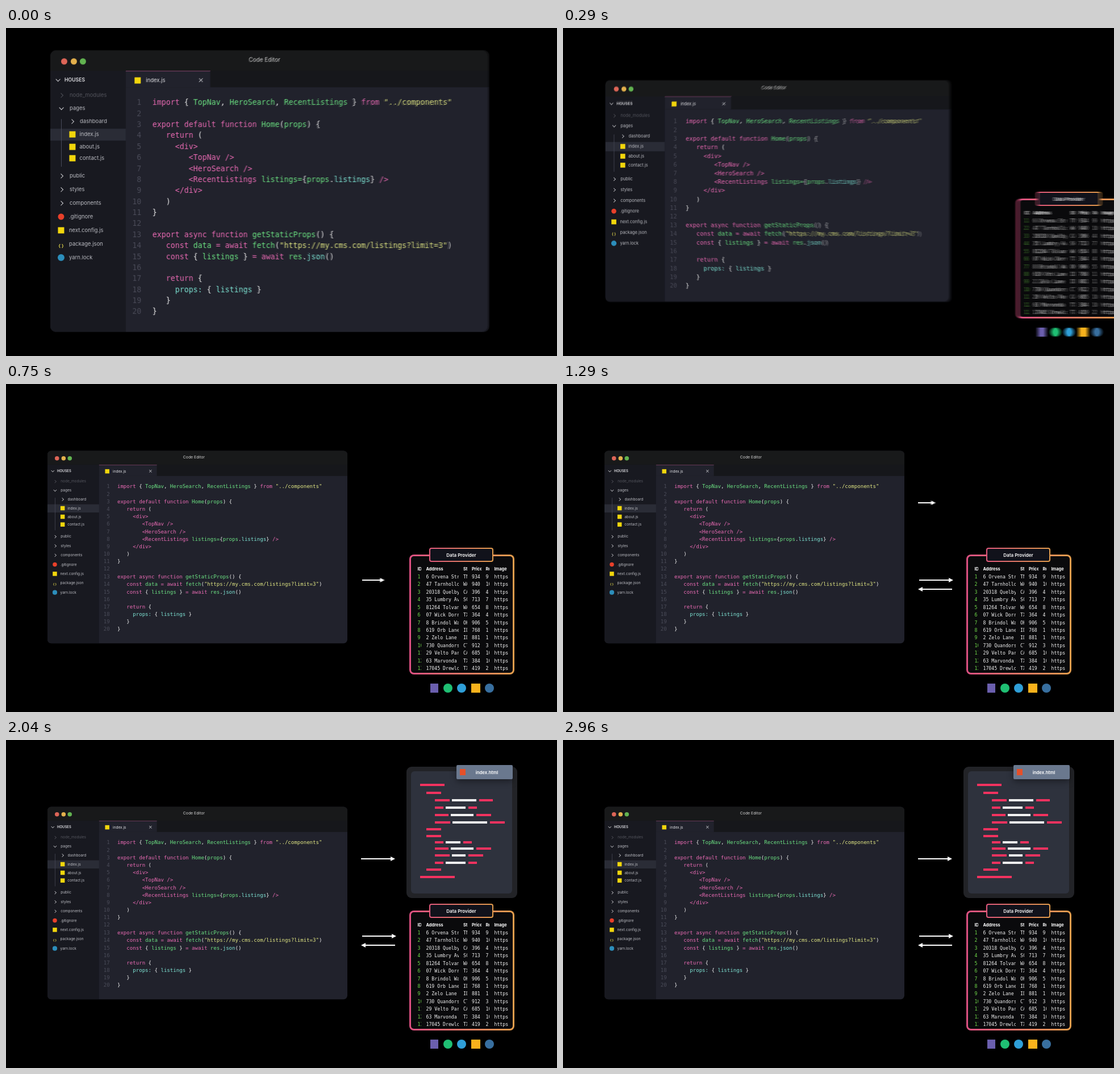
These frames come from a looping animation (970x577 px, 3.25 s). An HTML page:

```html
<!DOCTYPE html>
<html lang="en">
<head>
<meta charset="utf-8">
<title>Static page build</title>
<style>
@property --p { syntax: '<number>'; inherits: true; initial-value: 0; }
@keyframes go { from { --p: 0; } to { --p: 1; } }

html, body { margin: 0; width: 100%; height: 100%; overflow: hidden; background: #000; }
body { position: relative; font-family: Inter, sans-serif; }
.scene { position: absolute; left: 0; top: 0; width: 970px; height: 577px; overflow: hidden; background: #000; }
.scene[hidden] { display: none; }
:where(.scene div, .scene pre) { position: absolute; left: 0; top: 0; box-sizing: border-box; margin: 0; }

/* --s is the start in ms, --d the length, --t the clock */
.move {
  animation: go var(--d) var(--ease, cubic-bezier(.37, 0, .63, 1)) both paused;
  animation-delay: calc((var(--s) - var(--t)) * 1ms);
}
.enter { --s: 0; --d: 560ms; --ease: cubic-bezier(.333, .405, .667, 1); }
.text { height: 20px; line-height: 20px; margin-top: -10px; white-space: pre; }
.mid { transform: translateX(-50%); }

/* Editor */
.editor {
  width: 773px; height: 496px; border-radius: 10px; overflow: hidden; background: #21222c;
  transform-origin: 0 0;
  transform: translate(calc(78px - 5px * var(--p)), calc(39px + 78.4px * var(--p))) scale(calc(1 - .317 * var(--p)));
}
.titlebar { width: 773px; height: 36px; background: #18191a; }
.light { top: 13.5px; width: 11px; height: 11px; border-radius: 50%; }
.title { left: 377.5px; top: 16px; font-size: 10px; color: #d4d4d4; }
.tabs { left: 133px; top: 36px; width: 640px; height: 29px; background: #16171b; }
.tab { width: 149px; height: 29px; background: #21222c; border-top: 1.5px solid #84446c; }
.close { left: 265px; top: 52.5px; }
.close::before, .close::after {
  content: ''; position: absolute; left: -4.5px; top: -.5px; width: 9px; height: 1px;
  background: #c4c5c9; transform: rotate(45deg);
}
.close::after { transform: rotate(-45deg); }
.sidebar { top: 36px; width: 133px; height: 460px; background: #181920; }
.active { top: 138px; width: 133px; height: 21px; background: #2a2c36; }
.guide { left: 19px; top: 121px; width: 1px; height: 84px; background: #4a4c5c; }
.file { font-size: 9.5px; color: #bcbdc3; }
.head { font-size: 8.7px; font-weight: 600; color: #e4e4e8; }
.dim { color: #55565e; border-color: #55565e !important; }
.icon { transform: translate(-50%, -50%); }
.right, .down {
  width: 5.5px; height: 5.5px; border: solid #d8d8dc; border-width: 1.2px 1.2px 0 0;
  transform: translate(-70%, -50%) rotate(45deg);
}
.down { transform: translate(-50%, -70%) rotate(135deg); }
.js { width: 11px; height: 11px; background: #f2d60c; }
.git { width: 11px; height: 11px; border-radius: 50%; background: #e8402a; }
.yarn { width: 12px; height: 12px; border-radius: 50%; background: #2c8ebb; }
.braces::before { content: '{ }'; font: bold 8px Inter, sans-serif; color: #dcd04a; white-space: pre; }
.code, .nums { top: 82.3px; font: 13.29px/19.37px 'DejaVu Sans Mono', monospace; color: #eeeeee; }
.code { left: 180px; }
.nums { left: auto; right: 612.5px; text-align: right; color: #4b4c59; }
.code b { font-weight: normal; color: #ea6bb4; }
.code i { font-style: normal; color: #6ce383; }
.code u { text-decoration: none; color: #7fe6d6; }
.code s { text-decoration: none; color: #e2e884; }

/* Data provider */
.provider { transform: translateX(calc(275px * (1 - var(--p)))); }
.frame, .label {
  border: 3px solid transparent; border-radius: 8px;
  background: linear-gradient(#0a0a0c, #0a0a0c) padding-box, linear-gradient(90deg, #dc5082, #e39d4c) border-box;
}
.frame { left: 710px; top: 300px; width: 185px; height: 211px; }
.label {
  left: 745px; top: 288px; width: 113px; height: 25px; border-width: 2px; border-radius: 4px;
  background: linear-gradient(#11121b, #11121b) padding-box, linear-gradient(90deg, #e2597c, #e39d4c) border-box;
}
.name { left: 801.5px; top: 300.5px; font-size: 8px; font-weight: 600; color: #fff; }
.cell { overflow: hidden; font: 8.2px/20px 'DejaVu Sans Mono', monospace; color: #f2f2f2; }
.cell.th { font: 700 7.4px/20px Inter, sans-serif; color: #fff; }
.id { color: #74e04c; }
.brand { top: 527px; width: 16px; height: 16px; }
.round { border-radius: 50%; }

/* Arrows */
.arrow {
  width: calc(8px + 52px * var(--p)); height: 2px; opacity: calc(var(--p) * 20);
  background: linear-gradient(#fff, #fff) 0 0 / calc(100% - 6px) 2px no-repeat;
}
.arrow::after {
  content: ''; position: absolute; right: 0; top: -3px;
  border: solid transparent; border-width: 4px 0 4px 8px; border-left-color: #fff;
}
.back { left: auto; right: 285px; transform: scaleX(-1); }

/* Page */
.page { --s: 1610; --d: 400ms; opacity: var(--p); transform: translateX(calc(-17.5px * (1 - var(--p)))); }
.sheet { left: 705px; top: 47px; width: 195px; height: 231px; border-radius: 9px; background: #222327; }
.inner { left: 713px; top: 55px; width: 178px; height: 215px; border-radius: 6px; background: #2e323d; }
.chip { left: 793px; top: 44px; width: 99px; height: 25px; border-radius: 2px; background: #6a788e; box-shadow: 0 4px 12px #0006; }
.badge { left: 799px; top: 51px; width: 10px; height: 11px; background: #e5502a; }
.chipname { left: 846.5px; top: 56.5px; font-size: 7.8px; font-weight: 600; color: #fff; }
.bar { height: 4px; background: #f3325f; }
.bar.pale { background: #f2f2f2; }
</style>
</head>
<body>
<div class="scene" id="scene">
  <div class="editor move enter">
    <div class="titlebar"></div>
    <div class="light" style="left:18.5px;background:#dd6557"></div>
    <div class="light" style="left:35.5px;background:#e3b04c"></div>
    <div class="light" style="left:52px;background:#62b350"></div>
    <div class="title text mid">Code Editor</div>
    <div class="sidebar"></div>
    <div class="active"></div>
    <div class="guide"></div>
    <div class="files"></div>
    <div class="tabs"><div class="tab"></div></div>
    <div class="icon js" style="left:154px;top:52.5px"></div>
    <div class="file text" style="left:168.5px;top:52.5px;color:#e0e0e4">index.js</div>
    <div class="close"></div>
    <pre class="nums"></pre>
    <pre class="code"><b>import</b> { <i>TopNav</i>, <i>HeroSearch</i>, <i>RecentListings</i> } <b>from</b> <s>"../components"</s>

<b>export default function</b> <i>Home</i>(<i>props</i>) {
   <b>return</b> (
     <b>&lt;div&gt;</b>
        <b>&lt;TopNav /&gt;</b>
        <b>&lt;HeroSearch /&gt;</b>
        <b>&lt;RecentListings</b> <i>listings=</i>{<i>props</i>.<u>listings</u>} <b>/&gt;</b>
     <b>&lt;/div&gt;</b>
   )
}

<b>export async function</b> <i>getStaticProps</i>() {
   <b>const</b> <i>data</i> <b>= await</b> <i>fetch</i>(<s>"https://my.cms.com/listings?limit=3"</s>)
   <b>const</b> { <i>listings</i> } <b>= await</b> <i>res</i>.<u>json</u>()

   <b>return</b> {
     <u>props:</u> { <u>listings</u> }
   }
}</pre>
  </div>

  <div class="provider move enter">
    <div class="frame"></div>
    <div class="label"></div>
    <div class="name text mid">Data Provider</div>
    <div class="table"></div>
    <div class="brand" style="left:747px;width:14px;background:#6b5fae"></div>
    <div class="brand round" style="left:770px;background:#1fbf73"></div>
    <div class="brand round" style="left:794px;background:#2f9fd8"></div>
    <div class="brand" style="left:819px;background:#f8b21c"></div>
    <div class="brand round" style="left:843px;background:#386f9f"></div>
  </div>

  <div class="arrow move" style="left:627px;top:344px;--s:580;--d:300ms"></div>
  <div class="arrow back move" style="top:360px;--s:800;--d:320ms"></div>
  <div class="arrow move" style="left:625px;top:208px;--s:1130;--d:350ms"></div>

  <div class="page move">
    <div class="sheet"></div>
    <div class="inner"></div>
    <div class="bars"></div>
    <div class="chip"></div>
    <div class="badge"></div>
    <div class="chipname text mid">index.html</div>
  </div>
</div>

<script>
const scene = document.getElementById('scene');
const fill = (sel, html) => { scene.querySelector(sel).innerHTML = html; };
const box = (cls, x, y, text = '', extra = '') =>
  `<div class="${cls}" style="left:${x}px;top:${y}px;${extra}">${text}</div>`;

// Sidebar: y, label, text x, icon, icon x, extra class
const files = [
  [52, 'HOUSES', 25, 'down', 14, 'head'],
  [79, 'node_modules', 34, 'right', 20, 'dim'],
  [102, 'pages', 34, 'down', 19.5],
  [125, 'dashboard', 52, 'right', 39],
  [148, 'index.js', 51.5, 'js', 38.5],
  [170, 'about.js', 51.5, 'js', 38.5],
  [190, 'contact.js', 51.5, 'js', 38.5],
  [221, 'public', 34, 'right', 20],
  [245, 'styles', 34, 'right', 20],
  [268.5, 'components', 34, 'right', 20],
  [293, '.gitignore', 33, 'git', 19],
  [316.5, 'next.config.js', 33, 'js', 19],
  [340.5, 'package.json', 33, 'braces', 19],
  [364.5, 'yarn.lock', 33, 'yarn', 19]
];
fill('.files', files.map(([y, label, x, icon, ix, cls = '']) =>
  box(`icon ${icon} ${cls}`, ix, y) + box(`file text ${cls}`, x, y, label)).join(''));
fill('.nums', Array.from({ length: 20 }, (_, i) => i + 1).join('\n'));

// Table: columns are cut off at their width
const cols = [[724.5, 6.5], [739.5, 57.5], [805, 6.5], [820, 17], [844.5, 6.5], [859.5, 27]];
const rows = `6 Orvena Street|TN|934|9
47 Tarnhollow Rd|WA|940|10
20318 Quelby Rd|CA|396|4
35 Lumbry Avenue|SC|713|7
81264 Tolvan Pl|WA|654|8
07 Wick Dorr Way|TX|364|4
8 Brindol Way|OK|906|5
619 Orb Lane|ID|768|1
2 Zelo Lane|ID|881|1
730 Quandors Way|CT|912|3
29 Velto Par Rd|CA|685|10
63 Marvonda St|TX|384|10
17045 Drewlo Ave|TX|419|2`.split('\n').map((r, i) => [i + 1, ...r.split('|'), 'https']);
const line = (cells, y, cls) => cells.map((c, i) =>
  box(`cell text ${cls || (i ? '' : 'id')}`, cols[i][0], y, c, `width:${cols[i][1]}px`)).join('');
fill('.table', line(['ID', 'Address', 'State', 'Price', 'Reviews', 'Image'], 325.5, 'th') +
  rows.map((r, i) => line(r, 339 + i * 13.42)).join(''));

// Markup bars: y, x, then red / pale / red widths
const bars = [
  [79, 729, 43], [92.5, 740, 26],
  [106, 755, 26, 43, 24], [119, 755, 15, 35, 15], [132, 755, 24, 40, 26], [145, 755, 27, 61, 26],
  [157, 740, 26], [169, 740, 26],
  [180, 755, 15, 26, 15], [191, 755, 24, 40, 26], [203, 755, 26, 24, 26], [215.5, 755, 15, 35, 15],
  [228, 740, 26], [241, 729, 61]
];
fill('.bars', bars.map(([y, x, ...widths]) => widths.map((w, i) => {
  const bar = box(i === 1 ? 'bar pale' : 'bar', x, y - 2, '', `width:${w}px`);
  x += w + 4.3;
  return bar;
}).join('')).join(''));

// Motion blur: the mean of several moments within one shutter
const LOOP = 3250, STEP = 1000 / 24, SHUTTER = 13, COPIES = 5;
const layers = [scene];
for (let i = 1; i < COPIES; i++) {
  const copy = scene.cloneNode(true);
  copy.removeAttribute('id');
  copy.setAttribute('aria-hidden', 'true');
  copy.style.opacity = 1 / (i + 1);
  document.body.append(copy);
  layers.push(copy);
}

let last = -1;
function show(t) {
  const step = Math.floor((t % LOOP + 5) / STEP) % 78;
  if (step === last) return;
  last = step;
  const time = step * STEP, moving = time < 2050;
  layers.forEach((el, i) => {
    el.hidden = i > 0 && !moving;
    el.style.setProperty('--t', time + (moving ? (i / (COPIES - 1) - .5) * SHUTTER : 0));
  });
}

const start = performance.now();
function tick() {
  show(performance.now() - start);
  requestAnimationFrame(tick);
}
tick();
</script>
</body>
</html>
```
